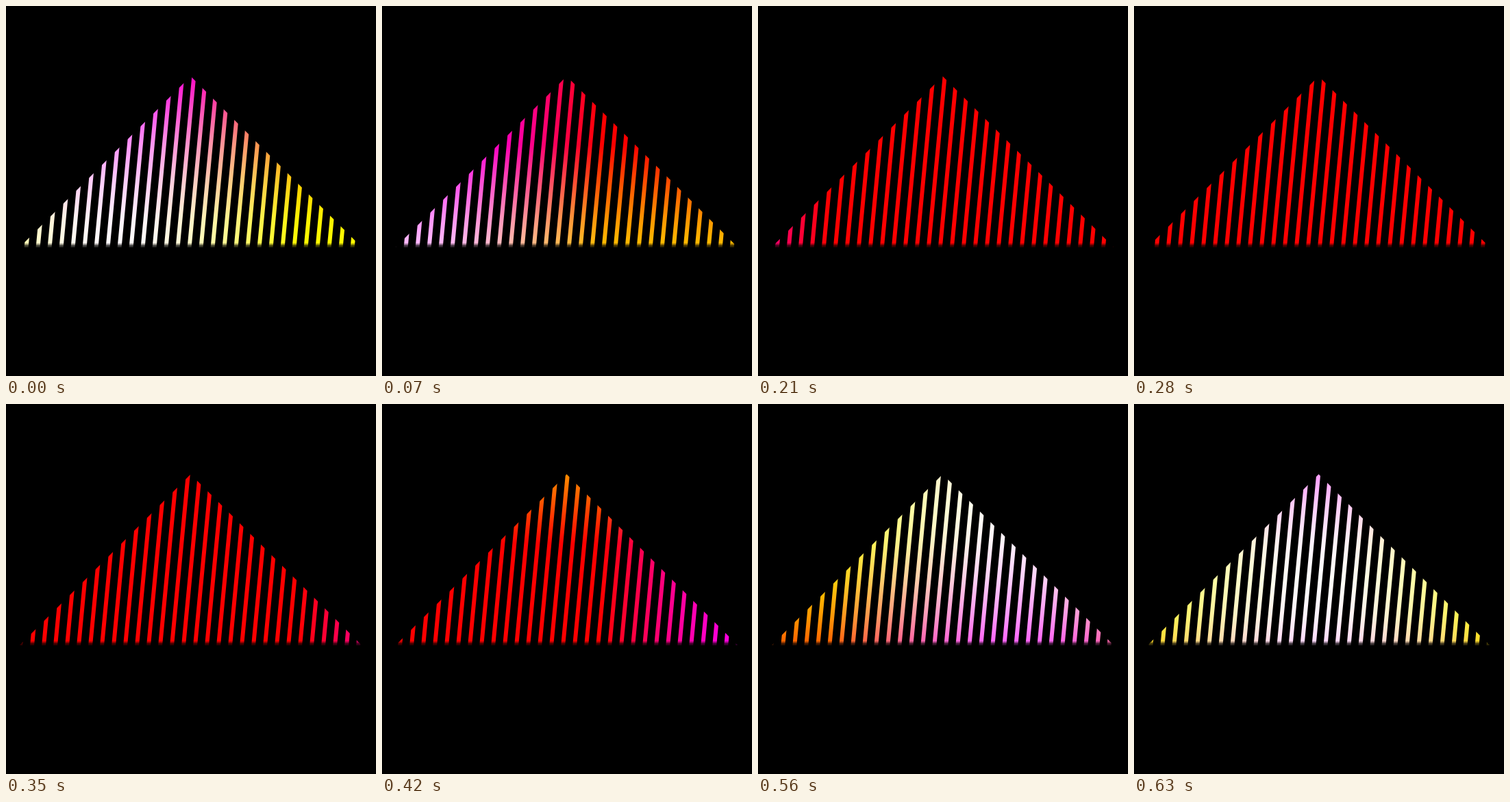
An HTML page without scripts that plays this animation: 540 by 540 pixels, repeating every 0.7 s.

```html
<!DOCTYPE html>
<html lang="en">
<head>
<meta charset="utf-8">
<title>Striped triangle</title>
<style>
  html, body { margin: 0; width: 100%; height: 100%; overflow: hidden; background: #000; }
  svg { display: block; width: 100%; height: 100%; }

  /* everything advances in ten equal hard steps per loop */
  .wave, .gaps { animation: move .7s steps(10) infinite; }
  .wave { mix-blend-mode: screen; }
  .green { --to: translate(0, 1080px); }
  .blue { --to: translate(-1080px, 0); }
  .gaps { --to: translate(51px, 0); }
  @keyframes move {
    from { transform: translate(0, 0); }
    to { transform: var(--to); }
  }
</style>
</head>
<body>
<svg viewBox="0 0 540 540">
  <defs>
    <clipPath id="triangle"><path d="M269.5 102.5 L519.5 352.5 H19.5 Z"/></clipPath>

    <!-- positive half of a cosine, period 1080 through reflection -->
    <linearGradient id="green" gradientUnits="userSpaceOnUse" spreadMethod="reflect" x1="0" y1="365" x2="0" y2="905">
      <stop offset="0" stop-color="rgb(0,255,0)"/>
      <stop offset=".1" stop-color="rgb(0,243,0)"/>
      <stop offset=".2" stop-color="rgb(0,206,0)"/>
      <stop offset=".3" stop-color="rgb(0,150,0)"/>
      <stop offset=".4" stop-color="rgb(0,77,0)"/>
      <stop offset=".5" stop-color="#000"/>
    </linearGradient>
    <linearGradient id="blue" gradientUnits="userSpaceOnUse" spreadMethod="reflect" x1="157" y1="0" x2="697" y2="0">
      <stop offset="0" stop-color="rgb(0,0,255)"/>
      <stop offset=".1" stop-color="rgb(0,0,243)"/>
      <stop offset=".2" stop-color="rgb(0,0,206)"/>
      <stop offset=".3" stop-color="rgb(0,0,148)"/>
      <stop offset=".4" stop-color="rgb(0,0,73)"/>
      <stop offset=".5" stop-color="#000"/>
    </linearGradient>

    <linearGradient id="fade" x1="0" y1="0" x2="0" y2="1">
      <stop offset="0" stop-opacity="0"/>
      <stop offset="1"/>
    </linearGradient>
  </defs>

  <rect width="540" height="540"/>
  <g clip-path="url(#triangle)">
    <rect width="540" height="540" fill="#f00"/>
    <rect class="wave green" y="-1080" width="540" height="1620" fill="url(#green)"/>
    <rect class="wave blue" width="1620" height="540" fill="url(#blue)"/>

    <!-- slanted black gaps between the coloured stripes -->
    <g transform="matrix(1 0 -.095 1 33.06 0)">
      <path class="gaps" d="M-86 225 H640" stroke="#000" stroke-width="260" stroke-dasharray="11 6" shape-rendering="crispEdges"/>
    </g>
    <rect y="345.5" width="540" height="6" fill="url(#fade)"/>
    <rect y="351.5" width="540" height="4"/>
  </g>
</svg>
</body>
</html>
```
